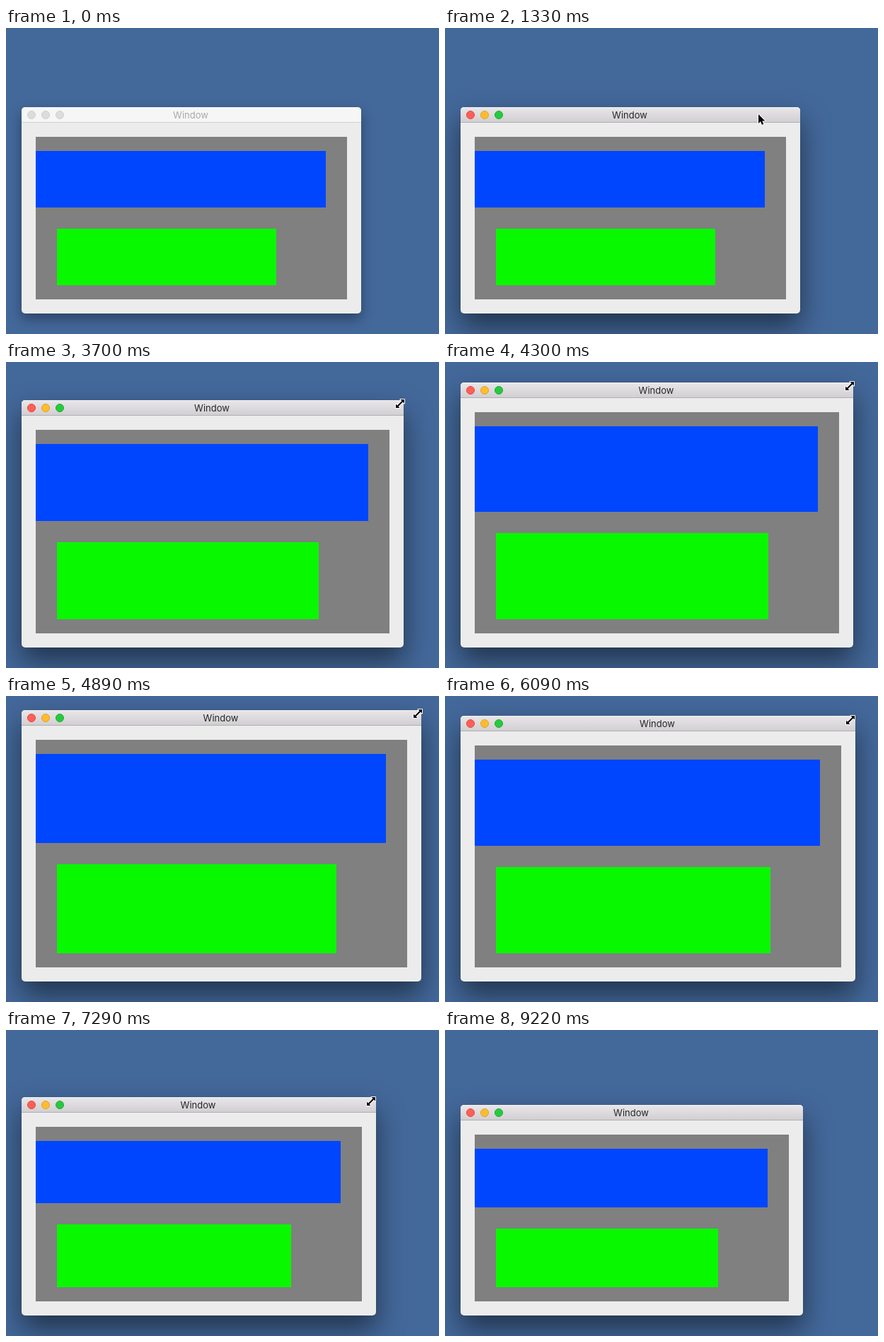
Animation of 612 by 433 pixels, one loop 9970 ms. Source, as an HTML page:

```html
<!DOCTYPE html>
<html lang="en">
<head>
<meta charset="utf-8">
<title>Window resize</title>
<style>
  html, body { margin: 0; width: 100%; height: 100%; overflow: hidden; background: #43689a; }
  div, svg { position: absolute; }
  #window {
    left: 22px; background: #ececec; border-radius: 5px;
    box-shadow: 0 0 1px rgba(0,0,0,.3), 0 8px 18px rgba(0,0,0,.35);
  }
  #window.active { box-shadow: 0 0 1px rgba(0,0,0,.4), 0 19px 38px rgba(0,0,0,.5); }
  #bar {
    left: 0; right: 0; top: 0; height: 21px; padding-right: 2px; border-bottom: 1px solid #d1d1d1;
    border-radius: 5px 5px 0 0; background: #f6f6f6; color: #a9a9a9;
    font: 13px/22px Inter, Roboto, sans-serif; text-align: center;
  }
  .active #bar {
    background: linear-gradient(#e9e7e9, #d1cfd1); border-color: #b1afb1;
    color: #262626; box-shadow: inset 0 1px #f3f2f3;
  }
  .light {
    top: 5px; width: 12px; height: 12px; border-radius: 50%; box-sizing: border-box;
    background: #dcdcdc; border: 1px solid #d0d0d0;
  }
  .active .light { background: var(--fill); border-color: var(--edge); }
  #panel { left: 20px; right: 20px; top: 42px; bottom: 20px; background: #808080; }
  #blue { left: 0; right: 30px; top: 20px; background: #0046ff; }
  #green { left: 30px; right: 100px; bottom: 20px; background: #08f800; }
  svg { left: 0; top: 0; width: 18px; height: 20px; overflow: visible; }
  path { fill: #000; stroke: #fff; stroke-width: 2; stroke-linejoin: round; paint-order: stroke; }
</style>
</head>
<body>
<div id="window">
  <div id="bar">Window
    <div class="light" style="left:8px; --fill:#ff5f57; --edge:#e2463f"></div>
    <div class="light" style="left:28px; --fill:#ffbd2e; --edge:#e0a028"></div>
    <div class="light" style="left:48px; --fill:#28c940; --edge:#1eac2f"></div>
  </div>
  <div id="panel"><div id="blue"></div><div id="green"></div></div>
</div>
<svg id="arrow"><path d="M0 0V13L3 10.3 5 15 7.3 14 5.3 9.4H9.4Z"/></svg>
<svg id="resize"><path d="M7.5 1H13V6.5L11 4.5 4.5 11 6.5 13H1V7.5L3 9.5 9.5 3Z"/></svg>
<script>
const LOOP = 9970, TICK = 148.8, LEAD = 22;
const LEFT = 22, BOTTOM = 404;

// Ticks at which the state switches
const ENTER = 1, ACTIVATE = 8, GRAB = 15, SHRINK = 41, RELEASE = 59, LEAVE = 62;

const at = (tick, x, y) => ({ tick, x, y });

// Top right corner of the window: grow, rest, shrink
const corner = [
  at(GRAB + 4, 502, 112), at(GRAB + 5, 509, 108), at(25, 562, 54), at(29, 577, 29), at(33, 587, 20),
  at(SHRINK - 1, 587, 20), at(SHRINK, 580, 28), at(47, 552, 64), at(49, 523, 95), at(53, 506, 106)
];

// Tip of the arrow: come in, cross the title bar, go out
const tip = [
  at(ENTER, 415, 408), at(6, 432, 124), at(ACTIVATE, 432, 124), at(13, 489, 112),
  at(RELEASE, 489, 132), at(LEAVE - 1, 422, 398)
];

function along(keys, tick) {
  const i = keys.findIndex(key => key.tick > tick);
  if (i === 0) return keys[0];
  if (i < 0) return keys[keys.length - 1];
  const a = keys[i - 1], b = keys[i];
  const u = (tick - a.tick) / (b.tick - a.tick);
  const mix = (p, q) => Math.round(p + (q - p) * u);
  return { x: mix(a.x, b.x), y: mix(a.y, b.y) };
}

const $ = id => document.getElementById(id);

function place(id, visible, x, y) {
  $(id).style.visibility = visible ? "visible" : "hidden";
  $(id).style.transform = `translate(${x}px, ${y}px)`;
}

function draw(time) {
  const tick = Math.floor((time + LEAD) / TICK);
  const { x: right, y: top } = along(corner, tick);
  const height = BOTTOM - top;
  const row = (height - 132) / 2;
  const win = $("window");
  win.className = tick >= ACTIVATE ? "active" : "";
  win.style.top = top + "px";
  win.style.width = right - LEFT + "px";
  win.style.height = height + "px";
  $("blue").style.height = Math.floor(row) + "px";
  $("green").style.height = Math.ceil(row) + "px";

  // The pointer runs slightly ahead of the corner it drags
  const resizing = tick >= GRAB && tick < RELEASE;
  const shrinking = tick >= SHRINK;
  place("resize", resizing, right - (shrinking ? 14 : 12), top - (shrinking ? 1 : 2));

  const { x, y } = along(tip, tick);
  place("arrow", !resizing && tick >= ENTER && tick < LEAVE, x, y);
}

function frame() {
  draw(performance.now() % LOOP);
  requestAnimationFrame(frame);
}
frame();
</script>
</body>
</html>
```
